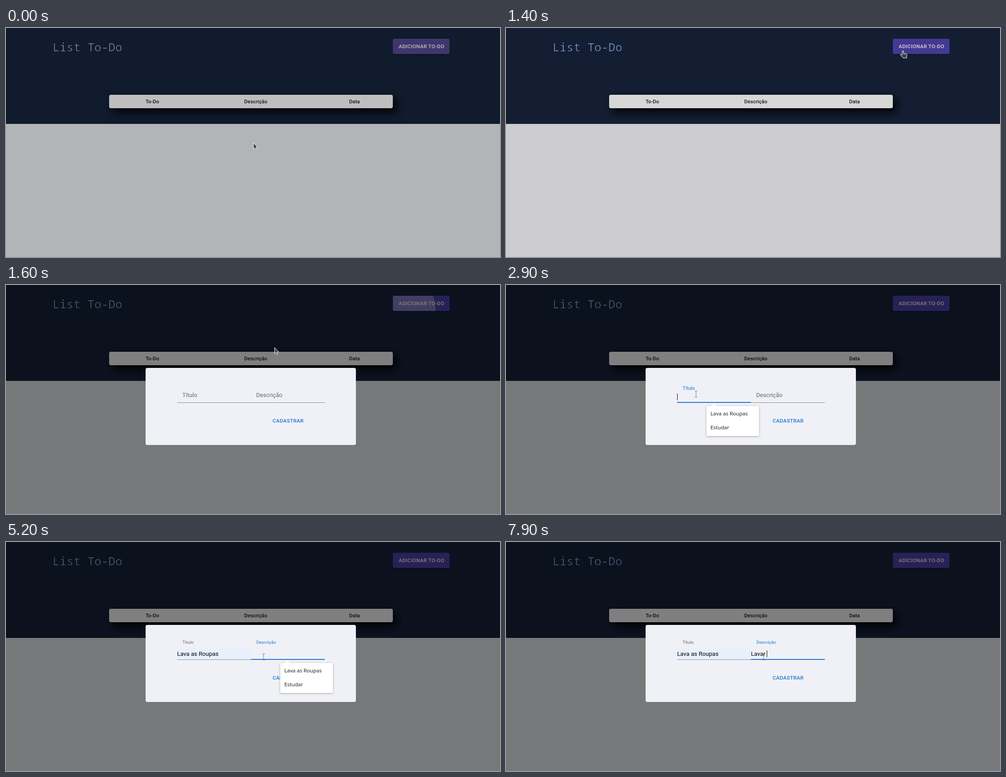
An HTML page for the animation above (8 s loop, 1097 by 511 pixels).

```html
<!DOCTYPE html>
<html lang="pt">
<head>
<meta charset="utf-8">
<title>List To-Do</title>
<style>
html, body { margin: 0; width: 100%; height: 100%; overflow: hidden; }
#stage { position: relative; width: 1097px; height: 511px; overflow: hidden; background: #f0f1f6; font: 13.12px/20px Roboto, sans-serif; }
#stage div, #stage svg { position: absolute; white-space: pre; }
#top { width: 1097px; height: 214px; background: #17243d; }
#title { left: 103.5px; top: 24px; font: 200 25.8px/36px "Noto Sans Mono", monospace; color: #a0c1fb; -webkit-text-stroke: .7px #17243d; }
#add, #addBox { left: 859px; top: 24px; width: 126px; height: 34px; border-radius: 4px; }
#add { overflow: hidden; }
#addBox { box-shadow: 0 3px 1px -2px #0003, 0 2px 2px #0002, 0 1px 5px #0002; }
#ripple { border-radius: 50%; background: #fff; }
.caps { font-weight: 500; font-size: 11.48px; letter-spacing: .33px; }
#table { left: 229px; top: 149px; width: 630px; height: 30px; border-radius: 4px; background: #fff; box-shadow: 8px 8px 20px #000; }
#table div { top: 5px; font-size: 11.48px; font-weight: 500; color: #1b1b1b; }
#shade { inset: 0; background: #000; }
#modal { left: 310px; top: 185px; width: 467px; height: 172px; border-radius: 4px; background: #f0f1f6; }
.field { top: 0; width: 164px; height: 172px; }
.fill { top: 52px; width: 164px; height: 25px; background: #e8f0fe; }
.line { width: 164px; }
.label { left: 11.5px; transform-origin: 0 50%; }
.text { top: 54.5px; }
.caret { display: inline-block; width: 1px; height: 15px; margin-right: -1px; background: #000; vertical-align: -3px; }
.list { left: 65px; top: 85px; width: 117px; border-radius: 3px; background: #fff; box-shadow: 0 1px 4px #0005; font: 11.5px/20px "Noto Sans", sans-serif; color: #222; }
.list::before { content: ""; position: absolute; left: 12px; top: -4px; width: 9px; height: 9px; background: #fff; transform: rotate(45deg); }
.row { left: 0; width: 108px; height: 30px; line-height: 30px; padding-left: 9px; }
</style>
</head>
<body>
<div id="stage">
  <div id="top"></div>
  <div id="title">List To-Do</div>
  <div id="addBox"></div>
  <div id="add"><div id="ripple"></div><div class="caps" style="left:13px;top:7px;color:#fff">ADICIONAR TO-DO</div></div>
  <div id="table"><div style="left:81px">To-Do</div><div style="left:300px">Descrição</div><div style="left:533px">Data</div></div>
  <div id="shade"></div>
  <div id="modal"><div class="caps" style="left:282px;top:108px;color:#1976d2">CADASTRAR</div></div>
  <svg id="cursor" width="24" height="24" viewBox="-2 -2 24 24" style="overflow:visible">
    <path id="arrow" d="M.5 .5V14L3.6 11.2L5.7 16L8 15L6 10.4H9.6Z" fill="#3e3e3e" stroke="#fff" stroke-linejoin="round"/>
    <path id="hand" d="M5 10V2Q5 .5 6.3 .5T7.7 2V6.5L14.5 8Q16 8.5 15.6 10.5L14.5 17H7L1 10.5Q.3 9 1.6 8.6T3.6 9.5Z" fill="#444" stroke="#fff" stroke-linejoin="round"/>
    <path id="beam" d="M-3 0.5H-1L0 1.5L1 .5H3M0 1V14M-3 14.5H-1L0 13.5L1 14.5H3" fill="none" stroke="#777"/>
  </svg>
</div>
<script>
const LOOP = 8000, STEP = 100;
const CHORE = 'Lava as Roupas', OTHER = 'Estudar';
const $ = id => document.getElementById(id);

// Last row whose time has passed.
const at = (rows, t) => rows.reduce((hit, row) => row[0] <= t ? row : hit);

function add(parent, cls, text = '') {
  const el = document.createElement('div');
  el.className = cls;
  el.textContent = text;
  parent.append(el);
  return el;
}

function makeField(left, name) {
  const box = add($('modal'), 'field');
  box.style.left = left + 'px';
  const part = { fill: add(box, 'fill'), line: add(box, 'line'), label: add(box, 'label', name), text: add(box, 'text') };
  part.word = document.createElement('span');
  part.caret = document.createElement('span');
  part.caret.className = 'caret';
  part.text.append(part.word, part.caret);
  part.list = add(box, 'list');
  part.rows = [CHORE, OTHER].map((s, i) => {
    const row = add(part.list, 'row', s);
    row.style.top = 2 + 31 * i + 'px';
    return row;
  });
  return part;
}

const task = makeField(70, 'Título');
const note = makeField(234, 'Descrição');

// time, x, y, shape
const moves = [
  [0, 549, 256, 'arrow'], [1200, 873, 53, 'hand'], [1300, 875, 50, 'hand'], [1500, 812, 83, 'hand'],
  [1600, 596, 139, 'arrow'], [1700, 510, 190, 'arrow'], [1800, 470, 218, 'arrow'], [1900, 448, 236, 'beam'],
  [2000, 436, 237, 'beam'], [2100, 422, 236, 'beam'], [3300, 526, 315, 'arrow'], [3500, 508, 285, 'arrow'],
  [4100, 546, 269, 'arrow'], [4300, 572, 249, 'beam']
];
const shades = [[0, .255], [1200, .23], [1300, .2], [1400, .157], [1500, 0], [1600, .5]];
// time, radius, opacity
const ripples = [[0, 0, 0], [1500, 46, .2], [1600, 86, .3], [1700, 126, .3], [1800, 140, .24], [1900, 140, .16], [2000, 140, .08], [2100, 0, 0]];
// time, text, caret, label float, line style, rows listed, list opacity, hovered row
const taskSteps = [
  [0, '', 0, 0, 'rest', 0, 0, -1], [2900, '', 1, .7, 'focus', 2, 1, -1], [3100, '', 1, 1, 'focus', 2, 1, -1],
  [3300, OTHER, 0, 1, 'focus', 2, 1, 1], [3500, CHORE, 0, 1, 'focus', 2, 1, 0], [3900, CHORE, 1, 1, 'focus', 2, .08, -1],
  [4100, CHORE, 1, 1, 'focus', 0, 0, -1], [4500, CHORE, 0, 1, 'rest', 0, 0, -1]
];
const noteSteps = [
  [0, '', 0, 0, 'rest', 0, 0, -1], [4300, '', 0, 0, 'hover', 0, 0, -1], [4500, '', 1, .1, 'focus', 2, 1, -1],
  [4700, '', 1, 1, 'focus', 2, 1, -1], [5200, '', 0, 1, 'focus', 2, 1, -1], [5900, '', 1, 1, 'focus', 2, 1, -1],
  [6300, '', 0, 1, 'focus', 2, 1, -1], [6700, 'L', 1, 1, 'focus', 1, 1, -1], [6800, 'La', 1, 1, 'focus', 1, 1, -1],
  [7000, 'Lav', 1, 1, 'focus', 1, 1, -1], [7200, 'Lava', 1, 1, 'focus', 1, 1, -1],
  [7600, 'Lavar', 1, 1, 'focus', 1, .08, -1], [7900, 'Lavar ', 1, 1, 'focus', 0, 0, -1]
];
const lines = { rest: ['#8b8c8f', 1, 77], hover: ['#222', 1.5, 76.5], focus: ['#1976d2', 2, 76] };

function showField(f, [, text, caret, lift, mode, count, alpha, hover], filled) {
  const [color, height, top] = lines[mode];
  f.word.textContent = text;
  f.caret.style.visibility = caret ? 'visible' : 'hidden';
  f.fill.style.opacity = filled && text ? 1 : 0;
  Object.assign(f.line.style, { background: color, height: height + 'px', top: top + 'px' });
  f.label.style.top = 51 - 22 * lift + 'px';
  f.label.style.transform = `scale(${1 - .25 * lift})`;
  f.label.style.color = mode === 'focus' ? '#1976d2' : '#666';
  f.list.style.opacity = count ? alpha : 0;
  f.list.style.height = (count > 1 ? 67 : 36) + 'px';
  f.rows.forEach((row, i) => {
    row.style.display = i < count ? 'block' : 'none';
    row.style.background = i === hover ? '#e4e4e6' : 'none';
  });
}

function showCursor(t) {
  let [, x, y, shape] = at(moves, t);
  if (t >= 300 && t < 1200) {
    const k = (t - 200) / 900, e = k * k * (3 - 2 * k);
    x += 324 * e;
    y -= 200 * e;
  }
  $('cursor').style.transform = `translate(${x - 2}px, ${y - 2}px)`;
  for (const id of ['arrow', 'hand', 'beam']) $(id).style.display = id === shape ? 'inline' : 'none';
}

function draw(now) {
  const t = Math.floor(now % LOOP / STEP) * STEP;
  const [, r, alpha] = at(ripples, t);
  Object.assign($('ripple').style, {
    left: 9 - r + 'px', top: 31 - r + 'px', width: 2 * r + 'px', height: 2 * r + 'px', opacity: alpha
  });
  $('add').style.background = t < 1200 ? '#564895' : '#5043ad';
  $('shade').style.opacity = at(shades, t)[1];
  $('modal').style.visibility = t < 1600 ? 'hidden' : 'visible';
  for (const f of [task, note]) f.caret.style.display = t < 1600 ? 'none' : 'inline-block';
  showField(task, at(taskSteps, t), true);
  showField(note, at(noteSteps, t), false);
  showCursor(t);
}

const start = performance.now();
function tick() {
  draw(performance.now() - start);
  requestAnimationFrame(tick);
}
tick();
</script>
</body>
</html>
```
